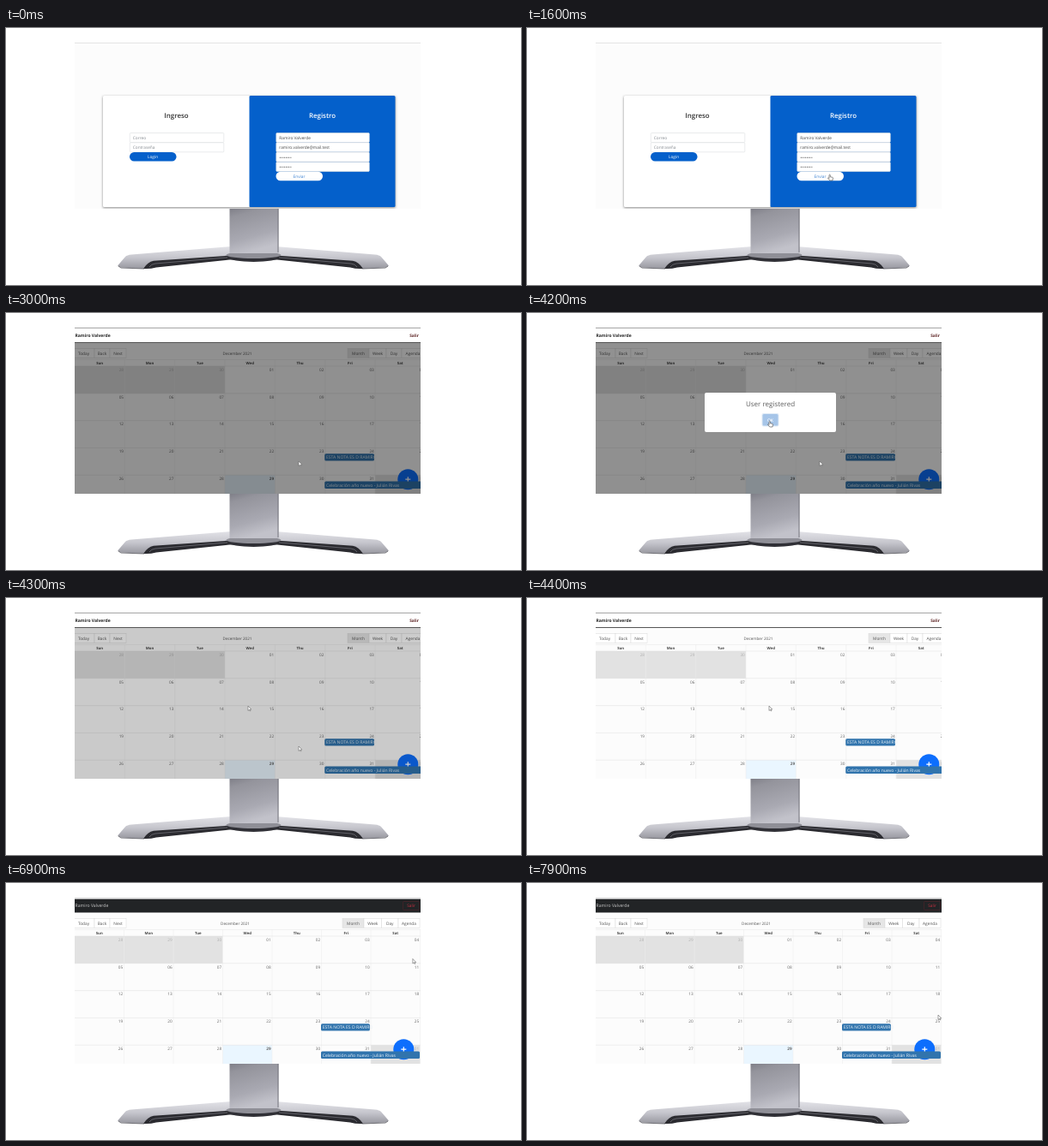
Write an HTML page that moves like this. It is 600 px wide and 300 px high and loops after 8000 ms.

```html
<!DOCTYPE html>
<html lang="es">
<head>
<meta charset="utf-8">
<title>Calendario</title>
<style>
html, body { margin: 0; width: 100%; height: 100%; overflow: hidden; background: #fff; }
svg { display: block; width: 600px; height: 300px; }
text { font-family: "Open Sans", "Noto Sans", sans-serif; text-rendering: geometricPrecision; }
</style>
</head>
<body>
<svg viewBox="0 0 600 300">
  <defs>
    <clipPath id="clip"><rect x="80" y="17" width="403" height="194"/></clipPath>
    <linearGradient id="neck" x1="0" y1="0" x2=".3" y2="1">
      <stop offset="0" stop-color="#7d7d86"/><stop offset=".2" stop-color="#94949c"/>
      <stop offset=".7" stop-color="#a9a9b2"/><stop offset="1" stop-color="#c2c2ca"/>
    </linearGradient>
    <linearGradient id="metal" x1="0" y1="0" x2="0" y2="1">
      <stop offset="0" stop-color="#e2e2e7"/><stop offset=".5" stop-color="#c6c6cd"/>
      <stop offset="1" stop-color="#97979f"/>
    </linearGradient>
    <filter id="soft" x="-10%" y="-10%" width="120%" height="125%"><feGaussianBlur stdDeviation="1.5"/></filter>
    <g id="leg">
      <path d="M130 277.500 L139 267 Q141 265 146 264.500 L262 255 H289 V269.500 H260 L172 279 L161 281 L134 279.500Z" fill="url(#metal)"/>
      <path d="M160 281 Q165 273 172 271.800 L262 265.500 H289 V270.500 H260 L175 279.500 Q168 281.500 160 281Z" fill="#2b2b30"/>
      <path d="M167 279 Q169 275.500 174 275 L258 267.800" fill="none" stroke="#6f6f76" stroke-width=".8"/>
      <path d="M131 278 L134 280 L161 281" fill="none" stroke="#55555b" stroke-width=".8"/>
    </g>
  </defs>

  <use href="#leg"/>
  <use href="#leg" transform="matrix(-1 0 0 1 576 0)"/>
  <ellipse cx="288.500" cy="268" rx="29" ry="5" fill="#303036"/>
  <ellipse cx="288.500" cy="265" rx="32" ry="4" fill="#8f8f97"/>
  <rect x="260.500" y="210" width="57" height="53" fill="url(#neck)"/>
  <path d="M317 211V262" stroke="#77777f"/>

  <g clip-path="url(#clip)">
    <rect x="80" y="17" width="403" height="194" fill="#fcfcfc"/>
    <g id="login"></g>
    <g id="wide"></g>
    <g id="narrow"></g>
    <rect id="shade" x="80" y="35" width="403" height="176"/>
    <g id="modal"></g>
    <path id="ghost" d="M0 0V5.500L1.300 4.300 2.200 6 3 5.600 2.200 4H3.800Z" fill="#fff" stroke="#555" stroke-width=".5" transform="translate(341 173)"/>
    <path id="arrow" d="M0 0V5.500L1.300 4.300 2.200 6 3 5.600 2.200 4H3.800Z" fill="#fff" stroke="#666" stroke-width=".6"/>
    <path id="hand" d="M0 .6Q.7-.4 1.300.6V2.800L4 3.300Q4.700 3.600 4.500 4.500L4 7H.8L-1.400 4.300Q-1.300 3.400-.5 3.900L0 4.400Z" fill="#fff" stroke="#444" stroke-width=".6"/>
  </g>
</svg>
<script>
const $ = id => document.getElementById(id);
const BLUE = '#0460cb', HOVER = '#e6e6e6', LOOP = 8000;

const box = (x, y, w, h, fill, more = '') =>
  `<rect x="${x}" y="${y}" width="${w}" height="${h}" fill="${fill}" ${more}/>`;
const label = (s, x, y, size, fill, anchor = 'middle', weight = 400) =>
  `<text x="${x}" y="${y}" font-size="${size}" fill="${fill}" text-anchor="${anchor}" font-weight="${weight}">${s}</text>`;
const line = (d, color, w = .5) => `<path d="${d}" fill="none" stroke="${color}" stroke-width="${w}"/>`;

function loginView() {
  const field = (x, y, w, s, fill) =>
    box(x, y, w, 11, '#fff', 'stroke="#dadde0" stroke-width=".6" rx="1"') + label(s, x + 3.5, y + 7.4, 4.8, fill, 'start');
  const pill = (x, y, s, bg, fg) => box(x, y, 54.5, 10.5, bg, 'rx="5.2"') + label(s, x + 27, y + 7, 4.8, fg);
  const filled = ['Ramiro Valverde', 'ramiro.valverde@mail.test', '••••••••', '••••••••'];
  return line('M80 17.5H483', '#e4e4e4', 1) +
    box(113, 80, 340.5, 130, '#888', 'filter="url(#soft)"') +
    box(113, 79, 171, 130, '#fff', 'rx="1.5"') +
    box(283.5, 79, 170, 130, BLUE, 'rx="1.5"') +
    label('Ingreso', 198.5, 104.5, 7.9, '#333', 'middle', 600) +
    label('Registro', 368.5, 104.5, 7.9, '#fff', 'middle', 600) +
    field(144.3, 122.5, 109.5, 'Correo', '#858b91') +
    field(144.3, 133.8, 109.5, 'Contraseña', '#858b91') +
    pill(144, 145, 'Login', BLUE, '#fff') +
    filled.map((s, i) => field(314.8, 122.5 + i * 11.3, 108.5, s, '#444')).join('') +
    pill(314.5, 167.7, 'Enviar', '#fff', '#3b80d0');
}

function navbar(dark) {
  const name = 'Ramiro Valverde';
  if (dark) return line('M80 17.5H483', '#dcdcdc', 1) + box(80, 18.7, 403, 15.8, '#222426') +
    label(name, 80.5, 28, 5.1, '#c9c9c9', 'start') +
    box(462.5, 21.5, 19, 10, 'none', 'stroke="#5a2228" stroke-width=".5" rx="1"') +
    label('Salir', 472, 28, 4.8, '#c93040');
  return box(80, 17, 403, 17.5, '#fff') + line('M80 17.5H483', '#a5a5a5', 1) + line('M80 34.5H483', '#555', 1) +
    label(name, 80.5, 28, 5, '#222', 'start', 700) + label('Salir', 475.5, 28, 4.8, '#5c2222', 'middle', 700);
}

// One month grid; the column width decides where everything sits.
function calendar(col, title, tabs, dark) {
  const top = 62, row = 31.8, x = i => 80 + col * i, y = i => top + row * i;
  const tab = (s, a, b, bg = '#fff') =>
    box(a, 41.5, b - a, 10.8, bg, `class="${s}" stroke="#d8d8d8" stroke-width=".5"`) +
    label(s, (a + b) / 2, 48.8, 4.8, '#555');
  let out = box(80, 17, 403, 194, '#fcfcfc') + navbar(dark);

  out += tab('Today', 78, 103) + tab('Back', 103, 121) + tab('Next', 121, 140) +
    label('December 2021', title, 48.8, 4.6, '#555') +
    ['Month', 'Week', 'Day', 'Agenda'].map((s, i) =>
      tab(s, tabs[i], tabs[i + 1], i ? '#fff' : HOVER)).join('');

  out += box(80, top, col * 3, row, '#e2e2e2') +
    box(x(3), y(4), col, row, '#eaf6ff') + box(x(6), y(4), col, row, '#e2e2e2');
  for (let i = 0; i < 7; i++) {
    out += label(['Sun', 'Mon', 'Tue', 'Wed', 'Thu', 'Fri', 'Sat'][i], x(i + .5), 60.2, 4.3, '#444', 'middle', 700) +
      line(`M${x(i + 1)} 54.5V211`, '#ececec');
  }
  for (let r = 0; r < 5; r++) {
    out += line(`M80 ${y(r)}H483`, '#dcdcdc');
    for (let c = 0; c < 7; c++) {
      const n = r * 7 + c - 2, off = n < 1 || n > 31;
      const day = String(n < 1 ? n + 30 : n > 31 ? n - 31 : n).padStart(2, '0');
      out += label(day, x(c + 1) - 1.3, y(r) + 5.7, 4.7, off ? '#b0b0b0' : '#666', 'end', n == 29 ? 700 : 400);
    }
  }
  const event = (s, top, w) => box(x(5) - .5, top, w, 8.4, '#3174ad', 'rx="1.5"') +
    label(s, x(5) + 1.2, top + 6, 5.1, '#e8f0f6', 'start');
  const cx = dark ? 463.3 : 468.3;
  return out + line('M80 54.5H483', '#e4e4e4') +
    `<circle cx="${cx}" cy="194.200" r="12" fill="#0d6efd"/>` +
    line(`M${cx - 3} 194.200h6m-3-3v6`, '#fff', 1.2) +
    event('ESTA NOTA ES D RAMIRO', 164.2, col - .6) +
    event('Celebración año nuevo - Julián Rivas', 196.5, col * 2);
}

$('login').innerHTML = loginView();
$('wide').innerHTML = calendar(58.35, 269.5, [398, 423, 443, 461, 487], false);
$('narrow').innerHTML = calendar(57.5, 267, [392, 417, 437.5, 457, 482], true);
$('modal').innerHTML = box(207, 93, 153, 46, '#fff', 'rx="2"') +
  label('User registered', 283.5, 109, 8, '#5f5f5f', 'middle', 500) +
  box(273.5, 117, 20, 15.5, '#dfeaf6', 'rx="2"') +
  box(274.5, 118, 18, 13.5, '#a6c5e8', 'rx="1.5"') +
  label('OK', 283.5, 126.5, 5, '#fff', 'middle', 600);
const dayTab = $('narrow').querySelector('.Day');

// Pointer path: time, x, y
const path = [
  [100, 440, 197], [900, 396, 173], [1000, 394, 173], [1500, 352, 171], [1800, 352, 171],
  [1900, 347, 172], [2600, 341, 173], [3400, 341, 173], [4100, 282, 126], [4700, 282, 126],
  [5600, 452, 43], [5800, 454.5, 44], [6200, 455, 44], [6600, 472, 60], [7400, 478, 150], [7900, 479, 154]
];
const clamp = v => Math.max(0, Math.min(1, v));

function pointer(t) {
  const i = Math.max(1, path.findIndex(p => p[0] >= t));
  const [t0, x0, y0] = path[i - 1], [t1, x1, y1] = path[i];
  const k = clamp((t - t0) / (t1 - t0)), e = k * k * (3 - 2 * k);
  return [x0 + (x1 - x0) * e, y0 + (y1 - y0) * e];
}

const show = (id, on) => $(id).style.display = on ? '' : 'none';

function draw(time) {
  const t = Math.floor((time % LOOP) / 100) * 100;
  show('login', t < 3000);
  show('wide', t >= 3000 && t < 4500);
  show('narrow', t >= 4500);

  const shaded = t >= 3000 && t < 4400;
  show('shade', shaded);
  $('shade').setAttribute('opacity', t == 4300 ? .2 : .43);

  show('modal', t >= 3200 && t < 4300);
  const s = [.7, 1.05, .98][(t - 3200) / 100] || 1;
  $('modal').setAttribute('transform', `translate(283.5 116) scale(${s}) translate(-283.5 -116)`);

  const [x, y] = pointer(t);
  const onTabs = t >= 4500 && y < 52;
  dayTab.setAttribute('fill', onTabs && x > 437 && x < 457 ? HOVER : '#fff');

  const onButton = (t < 3000 && x < 369 && y > 167) || (t >= 4000 && t < 4300) || onTabs;
  show('ghost', shaded && t >= 3400);
  show('hand', t >= 100 && onButton);
  show('arrow', t >= 100 && !onButton);
  $(onButton ? 'hand' : 'arrow').setAttribute('transform', `translate(${x} ${y})`);
}

const start = performance.now();
function tick() {
  draw(performance.now() - start);
  requestAnimationFrame(tick);
}
tick();
</script>
</body>
</html>
```
